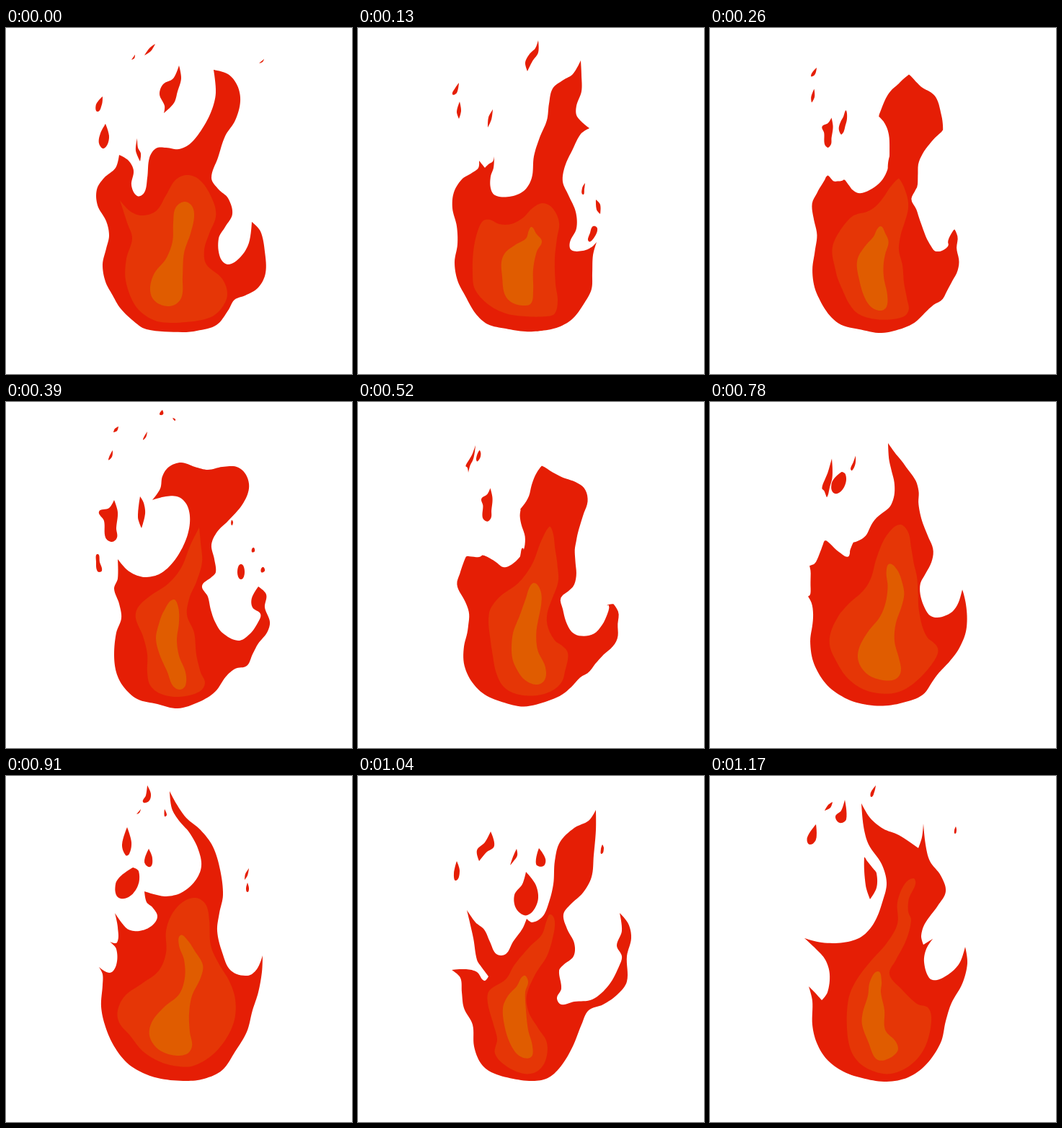
Recreate the animation shown at these times as an HTML page with a canvas. Size 480x480 px, loop 1.3 s.

```html
<!DOCTYPE html>
<html lang="en">
<head>
<meta charset="utf-8">
<title>Flame</title>
<style>
html, body { margin: 0; width: 100%; height: 100%; overflow: hidden; background: #fff; }
canvas { display: block; width: 480px; height: 480px; }
</style>
</head>
<body>
<canvas id="stage" width="480" height="480"></canvas>
<script>
const ctx = document.getElementById('stage').getContext('2d');
const STEP = 130;
const COLORS = { body: '#e51e05', glow: '#e53606', core: '#e05c00' };

// Outlines run clockwise from their tip; "!" marks a sharp corner.
const poses = [
  {
    body: `288,58! 308,64 321,80 325,102 318,128 304,150 294,180 285,208 295,224 308,236 314,258 304,276
      295,292 297,318 308,328 325,318 337,298 341,269! 353,282 359,310 360,340 350,360 332,371 317,377
      308,392 292,412 265,420 245,422 195,418 175,405 158,388 148,371 138,352 134,328 139,306 143,288
      139,268 127,246 126,224 136,208 152,194 157,176! 170,184 177,198 174,218 182,233 192,228 196,208
      199,180 208,167 222,166 240,168 256,160 272,140 285,115 291,90`,
    glow: `254,204 272,214 288,242 291,262 282,285 275,308 278,328 300,348 307,370 298,390 282,402 250,408
      215,408 195,400 178,383 166,350 167,320 175,292 168,270 158,239! 172,254 188,260 208,254 222,232 236,210`,
    core: `247,241 258,247 261,262 256,285 247,312 245,345 244,372 234,384 218,385 204,376 200,360 206,340
      222,320 231,296 232,270 235,250`,
    sparks: `134,95! 133,106 127,116 125,106|138,133! 143,152 136,167 129,160 131,146|179,37! 178,42 174,44!|
      182,153! 183,166 187,174 186,185! 180,170|207,22! 201,32 192,38! 199,28|
      240,52! 243,70 238,88 233,104 219,118! 220,108 213,92 218,78 232,70|358,43! 356,47 351,49!`
  },
  {
    body: `309,45! 310,65 310,88 303,108 304,123 321,139! 309,147 298,168 287,192 284,213 292,232 302,255
      303,278 294,297 296,308 312,309 324,304 331,297! 326,315 325,340 324,362 315,380 298,403 278,415
      255,420 232,421 205,417 180,411 163,396 149,372 138,350 134,325 138,300 137,275 131,250 133,228
      144,210 158,201 167,194 168,184! 176,194! 181,189 187,185 189,178! 188,194 184,206 184,222 190,232
      210,234 230,226 241,208 244,178 252,152 262,128 265,105 270,84 285,72 298,64`,
    glow: `256,243 270,250 279,270 276,292 273,320 274,355 277,378 273,396 262,400 232,400 205,396 180,383
      162,362 159,340 160,310 165,285 173,268 183,266 196,272 212,272 228,264 242,250`,
    core: `241,276 247,285 255,296 248,310 243,335 243,365 240,382 228,385 212,380 203,368 200,345 199,325
      204,312 218,301 233,292 237,281`,
    sparks: `140,76! 137,90 131,92 135,83|141,102! 143,115 140,126! 137,116|187,113! 185,127 180,138! 181,124|
      250,17! 250,34 242,46 235,60! 232,48 238,36 246,28|315,215! 314,223 312,231 311,222|
      330,238! 336,245 336,258! 331,252|326,275 332,278 328,290 320,296 322,284`
  },
  {
    body: `243,84 262,90 280,94 300,90 320,90 333,101 337,120 328,142 308,165 293,180 285,198 289,218
      291,236 285,243 272,255 280,270 284,288 290,305 300,320 322,331 338,322 350,305 353,294 342,285
      341,272 350,256! 361,267 359,285 366,305 362,320 350,335 342,350 334,366 318,370 305,381 290,402
      268,416 238,425 210,419 182,412 163,395 153,375 150,350 153,320 160,300 157,280 150,259 155,245
      155,218! 167,232 180,240 195,243 214,238 232,222 248,195 255,168 252,145 240,132 222,131 203,136!
      214,120 217,103 226,90`,
    glow: `268,174! 270,195 272,222 264,250 255,270 251,295 261,320 264,350 270,375 276,390 268,402 240,409
      215,405 200,393 196,375 196,350 190,325 180,300 183,285 200,269 225,252 243,230 256,198`,
    core: `232,274 239,285 240,305 237,330 240,352 249,375 249,393 241,399 231,393 224,375 213,350 208,328
      212,308 219,290`,
    sparks: `156,34! 154,40 149,42! 151,37|148,67! 147,76 142,80|
      150,136! 155,153 153,175 154,188 147,194 138,188 136,165 129,152 143,147|
      127,211 130,222 133,234 127,235 125,222|186,131! 191,140 193,155 188,175! 183,160|
      196,41! 194,49 190,52|217,11! 218,17 213,17|231,22! 235,24 234,26|313,164 315,167 313,171|
      326,225 331,236 326,246 321,236|343,202 345,207 341,208|356,229 359,234 354,236`
  },
  {
    body: `267,93! 278,105 293,120 305,145 302,165 291,182 292,205 305,228 318,245 316,264 303,278 290,290
      289,310 300,330 312,331 328,316 339,295 344,271! 353,287 361,312 361,335 350,354 330,367 311,379
      300,392 288,408 260,415 222,420 195,415 172,402 153,382 142,355 144,330 152,310 151,290 140,270
      126,252 126,235 138,216 155,202 165,195 165,184! 174,190 179,205 173,228 178,238 195,236 208,225
      209,205 199,188 200,175 212,169 230,170 247,161 260,142 266,120`,
    glow: `264,171 273,182 276,205 282,228 290,250 284,275 274,300 274,325 285,340 302,339 315,341 318,350
      308,366 288,386 265,402 238,406 210,400 190,382 179,360 177,330 183,300 184,290 195,270 220,250
      240,220 252,188`,
    core: `256,228 267,238 269,255 262,285 257,310 258,335 270,358 271,375 262,384 245,384 225,376 212,358
      211,340 220,312 236,285 246,258 250,236`,
    sparks: `170,86! 168,105 165,120 159,135 157,154! 154,142 149,138 158,122 164,110|
      189,67 193,72 189,84 185,80|217,103! 218,120 213,137 208,133 213,118|330,194! 330,201 324,204|
      336,223 341,236 336,245 331,251! 333,238`
  },
  {
    body: `227,21! 236,38 250,58 270,75 287,98 297,130 301,165 296,190 293,215 300,245 312,270 335,277
      348,268 356,249! 355,272 350,300 342,325 334,355 318,382 300,408 275,420 250,423 215,420 190,412
      168,398 150,375 138,348 132,320 134,290 134,275 129,265! 144,273 153,262 153,240 144,230! 154,231
      155,210 151,190! 160,203 170,213 185,215 202,208 210,195 203,182 195,175 192,160! 205,164 222,167
      243,162 262,146 271,125 266,100 254,78 240,62 230,45`,
    glow: `263,169 277,178 282,200 284,235 295,260 310,285 318,310 317,338 305,365 285,388 260,402 240,403
      215,397 190,382 172,360 157,342 155,325 165,305 190,287 212,270 222,245 222,215 230,192 245,175`,
    core: `242,221 252,228 262,243 273,262 270,280 258,305 254,330 255,355 258,375 250,386 230,387 210,378
      199,360 203,340 220,320 240,303 248,280 247,255 240,235`,
    sparks: `168,71! 174,92 171,108 166,110 161,95|176,127! 184,132 183,152 170,168 155,168 152,150 160,138|
      187,46! 185,51 181,53!|196,13! 201,25 198,35 190,36 194,27|198,101! 203,114 200,126 192,119|
      220,46! 223,54 220,56|337,128! 335,138 331,144! 332,136|335,148! 337,156 335,161 333,156`
  },
  {
    body: `330,47! 330,75 327,110 324,140 312,162 295,178 285,192 290,212 300,232 299,250 285,262 279,270
      282,295 276,308 282,317 300,313 325,310 348,290 363,262 366,250 359,235 366,215 363,190! 375,205
      379,225 373,250 373,285 360,303 340,317 320,325 310,345 298,375 282,402 265,418 245,423 215,420
      185,411 170,398 161,375 159,345 147,322 144,300 142,280 130,269! 150,268 165,272 175,284 181,278!
      172,266 165,255 160,225 151,186! 163,203 175,213 183,230 192,247 205,247 215,230 228,212 234,198!
      242,203 256,195 264,178 271,150 273,118 280,92 300,72 320,62`,
    glow: `267,192 273,202 270,225 262,250 246,275 234,305 237,328 250,350 262,370 260,395 248,410 230,413
      205,402 190,385 193,365 188,345 180,315 182,298 205,282 217,262 238,237 255,220 262,200`,
    core: `230,277 236,285 232,300 233,325 236,352 242,375 240,390 225,389 213,375 204,350 201,322 208,305
      220,292`,
    sparks: `137,118! 141,132 136,145 133,135|184,77! 189,97 178,106 168,118! 165,103 176,92|
      220,101! 221,110 216,118 211,124! 215,112|233,133! 247,152 249,175 235,193 220,185 217,165 228,150|
      251,100! 260,115 257,125 247,122|339,95! 341,100 338,108 337,101`
  },
  {
    body: `210,38! 222,58 240,73 262,82 289,100! 294,85 296,66! 299,95 305,118 320,138 327,160 316,180
      298,205 293,222 296,234! 309,226! 300,240 297,258 304,280 315,283 335,272 347,258 354,237! 357,260
      350,288 335,315 327,340 320,370 300,400 275,418 245,424 215,420 185,410 162,393 148,370 142,345
      142,312 137,292! 147,302 155,311! 163,300 166,275 160,255 147,240 131,225! 155,231 185,231 210,223
      228,203 240,172 245,148 238,122 220,95 213,70`,
    glow: `282,142 285,150 276,170 275,188 279,200 272,228 258,255 249,275 265,295 287,316 303,322 307,340
      300,372 285,395 262,410 240,413 212,402 196,382 190,350 192,310 202,285 222,258 245,232 260,205
      260,175 270,150`,
    core: `233,271 238,285 237,300 242,325 243,352 258,369 260,382 243,394 230,392 220,370 211,345 212,328
      219,305 222,285`,
    sparks: `147,67! 147,88 138,95 135,85|170,36! 167,44 159,48! 164,40|187,33! 189,60 180,65 174,56 182,48|
      214,113 218,118 226,128 231,135 231,155 222,171! 216,152|230,13! 228,22 224,29 223,23|
      341,70! 342,75 340,80 339,75`
  }
];

// Halves are blends of the two neighbouring poses.
const sequence = [0, 1, 1.5, 2, 2.5, 3, 3.5, 4, 5, 6];

const dist = (a, b) => Math.hypot(b[0] - a[0], b[1] - a[1]);
const mix = (a, b, t) => [a[0] + (b[0] - a[0]) * t, a[1] + (b[1] - a[1]) * t];

// Turns a point list into a smooth closed polyline.
function outline(text) {
  const words = text.trim().split(/\s+/), n = words.length;
  const pts = words.map(w => w.replace('!', '').split(',').map(Number));
  const dirs = pts.map((p, i) => {
    if (words[i].endsWith('!')) return [0, 0];
    const a = pts[(i + n - 1) % n], b = pts[(i + 1) % n], d = dist(a, b) || 1;
    return [(b[0] - a[0]) / d, (b[1] - a[1]) / d];
  });
  return pts.flatMap((p, i) => {
    const j = (i + 1) % n, q = pts[j], len = dist(p, q);
    return Array.from({ length: 8 }, (_, k) => {
      const t = k / 8, s = 1 - t;
      return [0, 1].map(c =>
        p[c] * s * s * (1 + 2 * t) + q[c] * t * t * (3 - 2 * t) +
        len * (dirs[i][c] * t * s * s - dirs[j][c] * t * t * s));
    });
  });
}

// Spreads points evenly along an open line.
function resample(line, count) {
  const at = [0];
  for (let i = 1; i < line.length; i++) at.push(at[i - 1] + dist(line[i - 1], line[i]));
  const total = at[at.length - 1];
  let i = 1;
  return Array.from({ length: count }, (_, k) => {
    const want = total * k / count;
    while (i < line.length - 1 && at[i] < want) i++;
    return mix(line[i - 1], line[i], (want - at[i - 1]) / (at[i] - at[i - 1] || 1));
  });
}

// Even points from tip to lowest point, then back up to the tip.
function halves(shape) {
  const low = shape.reduce((best, p, i) => p[1] > shape[best][1] ? i : best, 0) || 1;
  return [...resample(shape.slice(0, low + 1), 150),
          ...resample([...shape.slice(low), shape[0]], 150)];
}

function blend(a, b) {
  const to = halves(b);
  return halves(a).map((p, i) => mix(p, to[i], 0.5));
}

const shapes = poses.map(p => ({
  body: outline(p.body), glow: outline(p.glow), core: outline(p.core),
  sparks: p.sparks.split('|').map(outline)
}));

const frames = sequence.map(s => {
  const a = shapes[Math.floor(s)], b = shapes[Math.ceil(s)];
  if (a === b) return a;
  const count = Math.min(a.sparks.length, b.sparks.length);
  return {
    body: blend(a.body, b.body), glow: blend(a.glow, b.glow), core: blend(a.core, b.core),
    sparks: a.sparks.slice(0, count).map((spark, i) => blend(spark, b.sparks[i]))
  };
});

function fill(shape, color) {
  ctx.fillStyle = color;
  ctx.beginPath();
  shape.forEach(p => ctx.lineTo(p[0], p[1]));
  ctx.fill();
}

function draw() {
  const frame = frames[Math.floor(performance.now() / STEP) % frames.length];
  ctx.clearRect(0, 0, 480, 480);
  frame.sparks.forEach(spark => fill(spark, COLORS.body));
  for (const part in COLORS) fill(frame[part], COLORS[part]);
  requestAnimationFrame(draw);
}
draw();
</script>
</body>
</html>
```
